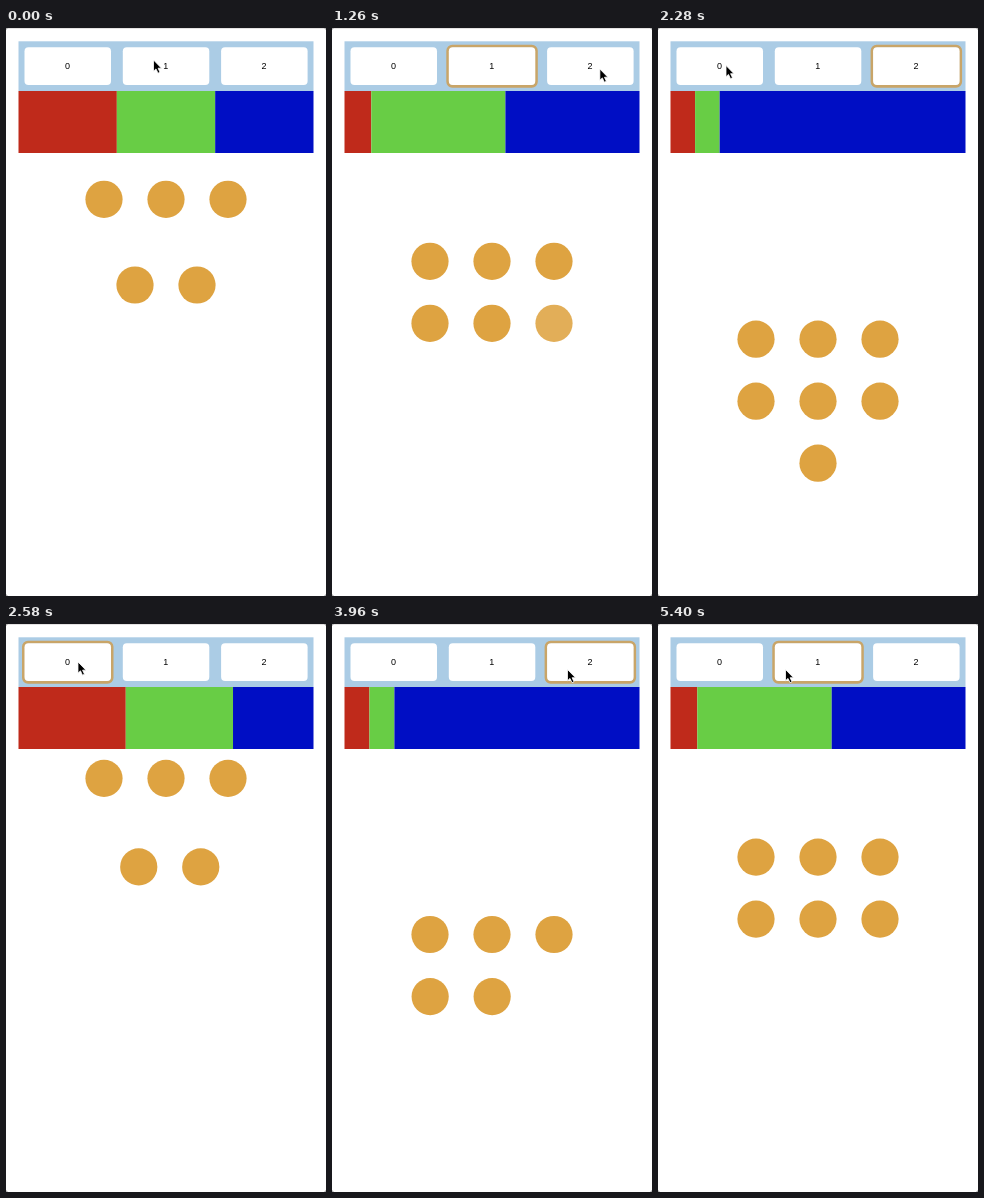
Write an HTML page that moves like this. It is 320 px wide and 568 px high and loops after 5430 ms.

```html
<!DOCTYPE html>
<html lang="en">
<head>
<meta charset="utf-8">
<title>Spring layout</title>
<style>
  html, body { margin: 0; width: 100%; height: 100%; overflow: hidden; background: #fff; }
  svg { display: block; width: 320px; height: 568px; }
  text { font: 9px "Liberation Sans", Arial, sans-serif; text-anchor: middle; }
</style>
</head>
<body>
<svg id="stage" viewBox="0 0 320 568">
  <defs>
    <filter id="soft" x="-20%" y="-20%" width="140%" height="140%"><feGaussianBlur stdDeviation=".7"/></filter>
  </defs>
  <rect width="320" height="1" fill="#e4e2e2"/>
  <path d="M0 0h2L0 2zM320 0h-2l2 2zM0 568h2l-2-2zM320 568h-2l2-2z" fill="#aaa"/>
  <rect x="12.5" y="13.3" width="295" height="50" fill="#abcce5"/>
</svg>
<script>
const LOOP = 5430, APPEAR_DELAY = 500, FADE = 200;
const LEFT = 12.5, WIDTH = 295;
const stage = document.getElementById('stage');

// Flex weights of the bars and centres of the dots for each layout
const grid = (n, top) => Array.from({ length: n }, (_, i) =>
  i < 6 ? [98 + i % 3 * 62, top + (i / 3 | 0) * 62] : [160, top + 124]);
const layouts = [
  { flex: [1, 1, 1], dots: [...grid(3, 171.3), [129, 257], [191, 257]] },
  { flex: [1, 5, 5], dots: grid(6, 233.3) },
  { flex: [1, 1, 10], dots: grid(7, 311.2) }
];
for (const l of layouts) {
  const sum = l.flex.reduce((a, b) => a + b);
  l.edges = [0, l.flex[0], l.flex[0] + l.flex[1], sum].map(v => LEFT + WIDTH * v / sum);
}

// [time, selected layout]
const clicks = [[585, 1], [1343, 2], [2420, 0], [3500, 2], [4820, 1]];
// [time, x, y] of the pointer tip
const path = [
  [0, 147.5, 32], [820, 147.5, 32], [1270, 268, 41], [1640, 268, 41],
  [2210, 68, 37.5], [2520, 68, 37.5], [3080, 188.5, 50.5], [3200, 188.5, 50.5],
  [3440, 235.5, 45.5], [4080, 235.5, 45.5], [4720, 127.5, 45.5], [LOOP, 127.5, 45.5]
];

function add(tag, attrs) {
  const el = document.createElementNS('http://www.w3.org/2000/svg', tag);
  set(el, attrs);
  return stage.appendChild(el);
}
function set(el, attrs) {
  for (const k in attrs) el.setAttribute(k, attrs[k]);
}

const rings = [0, 1, 2].map(i => {
  const x = 18.5 + i * 98.3;
  const ring = add('rect', { x: x - 1, y: 18.2, width: 88.5, height: 40, rx: 4.5,
    fill: 'none', stroke: '#c9a568', 'stroke-width': 3, filter: 'url(#soft)' });
  add('rect', { x, y: 19.3, width: 86.5, height: 37.8, rx: 4, fill: '#fff' });
  add('text', { x: x + 43, y: 40.8 }).textContent = i;
  return ring;
});
const bars = ['#bf2a1b', '#68cd45', '#000ec4'].map(fill => add('rect', { y: 63, height: 62, fill }));
const dots = Array.from({ length: 7 }, () => add('circle', { r: 18.6, fill: '#dea341' }));
const pointer = add('path', { d: 'M0 0V11.2L2.5 8.9L4.5 13.2L6.5 12.3L4.6 8.2H8Z',
  fill: '#000', stroke: '#fff', 'stroke-width': .8 });

const mix = (a, b, p) => a + (b - a) * p;
const clamp = v => Math.max(0, Math.min(1, v));

// Underdamped spring from 0 to 1
function spring(ms) {
  const t = ms / 1000, decay = 10.6, w = 16.96;
  return 1 - Math.exp(-decay * t) * (Math.cos(w * t) + decay / w * Math.sin(w * t));
}

function pointerAt(t) {
  const i = path.findIndex(k => k[0] > t);
  const a = path[i - 1], b = path[i];
  const u = (t - a[0]) / (b[0] - a[0]), p = u * u * (3 - 2 * u);
  return [mix(a[1], b[1], p), mix(a[2], b[2], p)];
}

function draw(t) {
  const n = clicks.filter(c => c[0] <= t).length;
  const to = n ? clicks[n - 1][1] : 0;
  const from = n > 1 ? clicks[n - 2][1] : 0;
  const since = n ? t - clicks[n - 1][0] : 0;
  const p = spring(since), a = layouts[from], b = layouts[to];

  rings.forEach((r, i) => set(r, { opacity: n && i === to ? 1 : 0 }));

  const edges = b.edges.map((e, i) => mix(a.edges[i], e, p));
  bars.forEach((bar, i) => set(bar, { x: edges[i], width: Math.max(0, edges[i + 1] - edges[i]) }));

  dots.forEach((dot, i) => {
    const end = b.dots[i], start = a.dots[i] || end;
    if (!end) return set(dot, { opacity: 0 });
    set(dot, {
      cx: mix(start[0], end[0], p),
      cy: mix(start[1], end[1], p),
      opacity: a.dots[i] ? 1 : clamp((since - APPEAR_DELAY) / FADE)
    });
  });

  set(pointer, { transform: `translate(${pointerAt(t)})` });
}

const begin = performance.now();
function tick() {
  draw((performance.now() - begin) % LOOP);
  requestAnimationFrame(tick);
}
tick();
</script>
</body>
</html>
```
